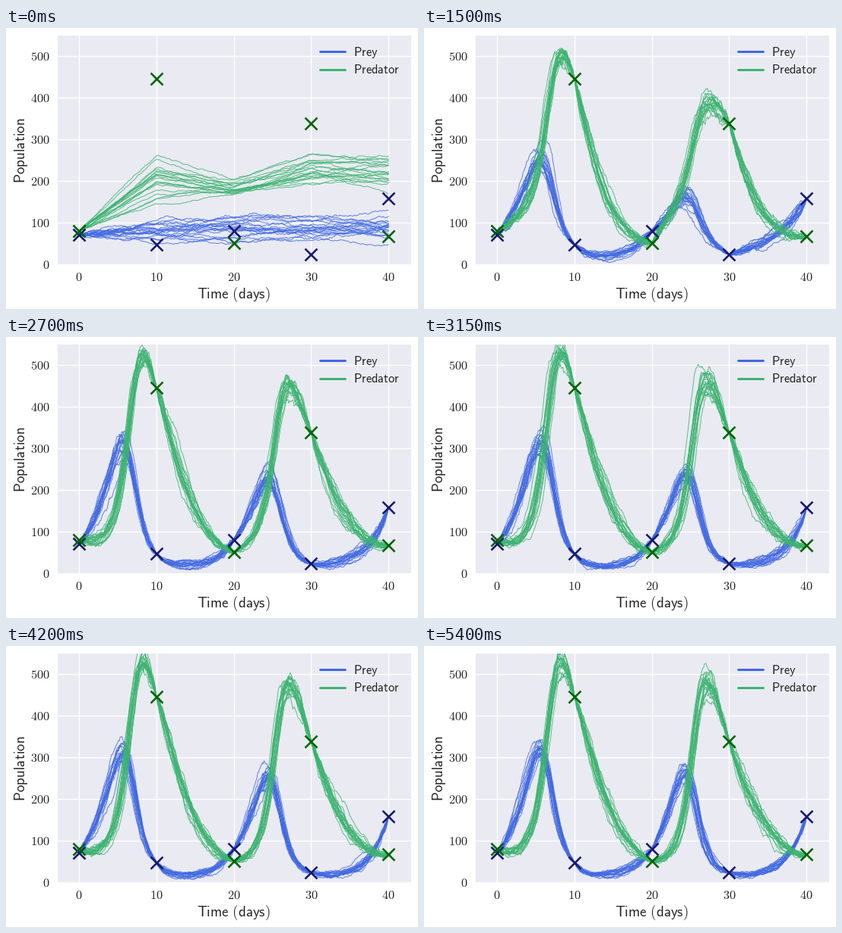
A matplotlib script for the animation above (5550 ms loop, 542 by 371 pixels).

```python
import numpy as np
import matplotlib.pyplot as plt
from matplotlib.animation import FuncAnimation

W, H, DPI = 542, 371, 100
FRAMES, INTERVAL = 37, 150
PATHS = 20
INK = "#262626"
BLUE, GREEN = "royalblue", "mediumseagreen"

OBS_T = np.arange(0, 41, 10)
OBS = np.array([(71, 79), (47, 446), (80, 50), (23, 339), (157, 66)], float)

# Lotka-Volterra rates: prey growth, predation, predator death
GROWTH, PREDATION, DEATH = 0.51, 0.0025, 0.3

# One value per ten-day leg
LEAD = [1, 1, 1.32, 1]       # head start of the simulated cycle
HUMP = [39, -34, 28, 0]      # sway of the prey before the cycle is learnt
LEARN = [3, 5, 7, 7]         # frames needed to learn the cycle
FIRST_FIT = 6                # frame at which all observations are met

STEPS = 100
dt = 10 / STEPS
s = np.linspace(0, 1, STEPS + 1)
t = np.linspace(0, 40, 4 * STEPS + 1)
arch = 4 * s * (1 - s)
arch_all = np.append(np.tile(arch[:-1], 4), 0)


def px(n):
    return n * 72 / DPI


def sans(text):
    return r"$\mathsf{%s}$" % text.replace(" ", r"\ ")


def early_leg(k):
    """Simple sweep from one observation to the next: columns prey, predator."""
    a, b = OBS[k], OBS[k + 1]
    prey = a[0] + (b[0] - a[0]) * s + HUMP[k] * np.sin(np.pi * s)
    rise = np.sin(np.pi * s / 2) if b[1] > a[1] else 1 - (1 - s)**3
    return np.column_stack([prey, a[1] + (b[1] - a[1]) * rise])


def cycle_leg(k):
    """Predator-prey dynamics, bent in log space to meet both observations."""
    a, b = OBS[k], OBS[k + 1]
    x, y = a * LEAD[k]
    states = [(x, y)]
    for _ in range(STEPS):
        x *= np.exp(dt * (GROWTH - PREDATION * y))
        y *= np.exp(dt * (PREDATION * x - DEATH))
        states.append((x, y))
    log = np.log(states)
    log += np.outer(1 - s, np.log(a) - log[0]) + np.outer(s, np.log(b) - log[-1])
    log[:, 1] += 0.09 * max(np.log(a[1] / b[1]), 0) * arch
    return np.exp(log)


EARLY = [early_leg(k) for k in range(4)]
CYCLE = [cycle_leg(k) for k in range(4)]


def mean_curves(frame):
    legs = []
    for early, cycle, tau in zip(EARLY, CYCLE, LEARN):
        learnt = 1 - np.exp(-max(frame - FIRST_FIT, 0) / tau)
        legs.append((early + learnt * (cycle - early))[:-1])
    return np.vstack(legs + [OBS[-1:]]).T


def bridges(rng):
    """Brownian paths tied to zero at every observation."""
    steps = rng.normal(0, np.sqrt(dt), (PATHS, len(t)))
    steps[:, 0] = 0
    walk = np.cumsum(steps, axis=1)
    return walk - np.array([np.interp(t, OBS_T, w[::STEPS]) for w in walk])


def untrained(rng, centre, spread):
    z = 0.75 * rng.normal(0, 1, (PATHS, 1)) + 0.65 * rng.normal(0, 1, (PATHS, 5))
    nodes = np.array(centre) + np.clip(z, -1.9, 1.9) * np.array(spread)
    return np.array([np.interp(t, OBS_T, n) for n in nodes])


def sample(frame, rng, mean, centre, spread, calm):
    fit = 1 - (1 - min(frame / FIRST_FIT, 1))**2
    base = (1 - fit) * untrained(rng, centre, spread) + fit * mean
    floor = np.interp(frame, [0, 6, 10], [calm, 4, 0.7])
    gain = np.interp(frame, [0, 6, 10], [0.12, 0.25, 0.58])
    noise = (floor + gain * np.sqrt(np.maximum(base, 1))) * bridges(rng)
    # small timing differences between paths, widest on steep slopes
    late = rng.normal(0, 0.24, (PATHS, 1)) * arch_all
    return np.maximum(base + noise + fit * late * np.gradient(mean, t), 2)


plt.rcParams["mathtext.fontset"] = "cm"
fig = plt.figure(figsize=(W / DPI, H / DPI), dpi=DPI, facecolor="white")
left, right, top, bottom = 67.5, 532.5, 10, 311.5
day, day_zero = 10.175, 96.2
ax = fig.add_axes([left / W, 1 - bottom / H, (right - left) / W, (bottom - top) / H],
                  facecolor="#EAEAF2")
ax.set_xlim((left - day_zero) / day, (right - day_zero) / day)
ax.set_ylim(0, 550)
x_ticks, y_ticks = range(0, 41, 10), range(0, 501, 100)
ax.set_xticks(x_ticks, [f"${v}$" for v in x_ticks])
ax.set_yticks(y_ticks, [f"${v}$" for v in y_ticks])
ax.tick_params(length=0, pad=px(10), labelsize=px(16.4), labelcolor=INK)
ax.grid(color="white", lw=px(1.35))
ax.set_axisbelow(True)
for spine in ax.spines.values():
    spine.set_visible(False)


def label(x, y, text, size, **kw):
    fig.text(x / W, 1 - y / H, sans(text), fontsize=px(size), color=INK,
             va="baseline", rotation_mode="anchor", **kw)


label(299.5, 357, "Time (days)", 19.1, ha="center")
label(25.5, 162, "Population", 19.1, ha="center", rotation=90)

for y, name, color in [(31, "Prey", BLUE), (54.5, "Predator", GREEN)]:
    fig.add_artist(plt.Line2D([413.3 / W, 446.3 / W], [1 - y / H] * 2, color=color,
                              lw=px(3), solid_capstyle="round"))
    label(457.5, y + 5.7, name, 16.4, ha="left")


def path_lines(color, z):
    return [ax.plot([], [], color=color, lw=px(1), alpha=0.8, zorder=z)[0]
            for _ in range(PATHS)]


lines = path_lines(BLUE, 3) + path_lines(GREEN, 4)
for values, color, z in zip(OBS.T, ["midnightblue", "darkgreen"], [5, 6]):
    ax.plot(OBS_T, values, "x", color=color, ms=px(15.8), mew=px(2.6), zorder=z)


def update(frame):
    rng = np.random.default_rng(100 + frame)
    prey_mean, predator_mean = mean_curves(frame)
    prey = sample(frame, rng, prey_mean,
                  [71, 76, 83, 80, 86], [0, 15, 18, 18, 23], 2)
    predator = sample(frame, rng, predator_mean,
                      [79, 198, 180, 226, 214], [0, 38, 12, 20, 24], 0.2)
    for line, y in zip(lines, np.vstack([prey, predator])):
        line.set_data(t, y)
    return lines


anim = FuncAnimation(fig, update, frames=FRAMES, interval=INTERVAL,
                     repeat=True, repeat_delay=0, blit=False)
plt.show()
```
